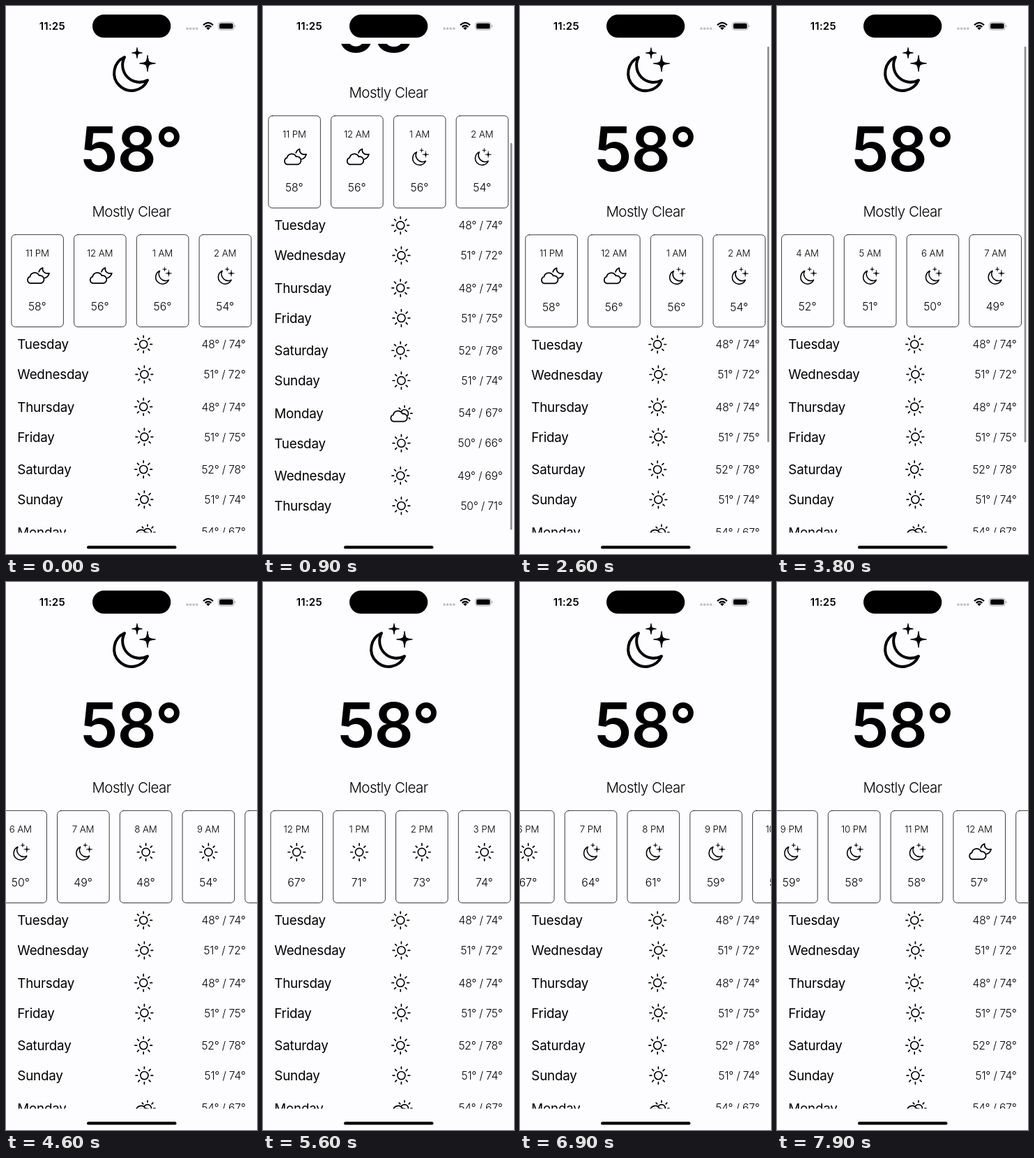
Write an HTML page that moves like this. It is 360x783 px and loops after 8 s.

```html
<!DOCTYPE html>
<html lang="en">
<head>
<meta charset="utf-8">
<title>Weather</title>
<style>
html, body { margin: 0; width: 100%; height: 100%; overflow: hidden; background: #fdfcfe; }
svg { display: block; width: 100%; height: 100%; }
text { font-family: Inter, Roboto, sans-serif; fill: #000; }
.line { fill: none; stroke: #000; stroke-linecap: round; stroke-linejoin: round; }
.time { font-size: 15px; font-weight: 600; letter-spacing: .2px; }
.now { font-size: 88px; font-weight: 600; letter-spacing: -1.2px; }
.sky { font-size: 20.5px; font-weight: 350; letter-spacing: -.55px; text-anchor: middle; }
.hour { font-size: 13.3px; font-weight: 350; letter-spacing: -.1px; text-anchor: middle; }
.temp { font-size: 15.8px; font-weight: 350; text-anchor: middle; }
.day { font-size: 18.8px; letter-spacing: -.22px; }
.range { font-size: 15.6px; font-weight: 350; letter-spacing: -.2px; text-anchor: end; }
</style>
</head>
<body>
<svg id="stage" viewBox="0 0 360 783"></svg>
<script>
const BG = '#fdfcfe';
const LOOP = 8000, STEP = 100;
const MAX = 157;               // vertical scroll range
const DRAG = 80, DRAG_MS = 100; // finger travel before each horizontal release
const PITCH = 89.77;           // distance between hourly cards

const at = (x, y, body, scale = 1) => `<g transform="translate(${x} ${y}) scale(${scale})">${body}</g>`;
const text = (cls, x, y, str) => `<text class="${cls}" x="${x}" y="${y}">${str}</text>`;
const line = (d, w, fill = 'none') => `<path class="line" d="${d}" stroke-width="${w}" style="fill:${fill}"/>`;

// Icons, each centred on 0,0
function star(x, y, r) {
  const c = r * .1;
  const arm = (cx, cy, ex, ey) => `C${cx} ${cy} ${cx} ${cy} ${ex} ${ey}`;
  return at(x, y, line(`M0 ${-r}${arm(c, -c, r, 0)}${arm(c, c, 0, r)}${arm(-c, c, -r, 0)}${arm(-c, -c, 0, -r)}z`, 1.2, '#000'));
}

const moon = line('M-14-18A25 25 0 1 0 19 15A24.4 24.4 0 0 1-14-18z', 4) + star(19, -9, 11.4) + star(4, -24, 7.4);

function sun(r = 5.6, near = 9.6, far = 12.3) {
  let rays = '';
  for (let i = 0; i < 8; i++) {
    const c = Math.cos(i * Math.PI / 4), s = Math.sin(i * Math.PI / 4);
    rays += `M${c * near} ${s * near}L${c * far} ${s * far}`;
  }
  return `<circle class="line" r="${r}" stroke-width="1.6"/>` + line(rays, 1.7);
}

const cloud = line('M-11 10.2A4.9 4.9 0 0 1-11.2.8A7 7 0 0 1 2-.8A5.6 5.6 0 0 1 4.5 10.2z', 1.75, BG);
const cloudMoon = line('M1.6-6.2C2.5-9 4.5-11 7-11.8C6.2-6 10.5-3 16.5-4.2C15.3-.5 13 2 10.2 2.6', 1.75) + cloud;
const cloudSun = at(4, 0, sun(5.4, 8.8, 11)) + at(-1, 1.3, cloud);

// Hourly cards, starting at 11 PM
const temps = [58, 56, 56, 54, 53, 52, 51, 50, 49, 48, 54, 59, 63, 67, 71, 73, 74, 74, 71, 67, 64, 61, 59, 58, 58, 57, 56, 55];
const skies = 'ccmmmmmmmsssssssssssmmmmmccc';
const hourIcon = {
  c: at(37.8, 386, cloudMoon),
  m: at(38.6, 385.5, moon, .39),
  s: at(37.3, 386, sun())
};

function card(temp, i) {
  const h = (23 + i) % 24;
  return at(7.8 + PITCH * i, 0,
    '<rect class="line" y="326.7" width="74.6" height="131.8" rx="5.5" stroke-width=".92" style="stroke:#2c2c2c"/>' +
    text('hour', 37.1, 358, `${h % 12 || 12} ${h < 12 ? 'AM' : 'PM'}`) +
    hourIcon[skies[i]] + text('temp', 37.1, 435.3, temp + '°'));
}

// Daily rows
const days = [
  ['Tuesday', 48, 74], ['Wednesday', 51, 72], ['Thursday', 48, 74], ['Friday', 51, 75], ['Saturday', 52, 78],
  ['Sunday', 51, 74], ['Monday', 54, 67], ['Tuesday', 50, 66], ['Wednesday', 49, 69], ['Thursday', 50, 71]
];

function row([name, low, high], i) {
  const y = 483.3 + 89.4 * (i >> 1) + 43 * (i % 2);
  const icon = name === 'Monday' ? at(199, 752, cloudSun) : at(197.2 + 1.2 * (i % 2), y, sun());
  return text('day', 16.3, y + 7, name) + icon + text('range', 343.6, y + 5.8, `${low}° / ${high}°`);
}

function statusBar() {
  let dots = '';
  for (let i = 0; i < 4; i++) dots += `<circle cx="${260 + 4.6 * i}" cy="32.3" r="1.7" fill="#bdbcbe"/>`;
  const wifi = '<g class="line" style="stroke-linecap:butt" stroke-width="2.2">' +
    '<path d="M283 27.2Q290 20.6 297 27.2M285.6 30Q290 26 294.4 30"/></g>' +
    '<path d="M287.2 31.4Q290 29.2 292.8 31.4L290 34.2z"/>';
  const battery = '<rect x="304.5" y="23.3" width="22.6" height="10.8" rx="3.4" fill="none" stroke="#a9a8aa"/>' +
    '<rect x="306" y="24.8" width="19.6" height="7.8" rx="2.2"/>' +
    '<path d="M328.3 27v3.6q1.4-.5 1.4-1.8t-1.4-1.8z" fill="#a9a8aa"/>';
  return text('time', 47.8, 34.2, '11:25') + '<rect x="124" y="12.3" width="112.3" height="33" rx="16.5"/>' + dots + wifi + battery;
}

document.getElementById('stage').innerHTML = `
  <clipPath id="view"><rect y="54" width="360" height="698.5"/></clipPath>
  <rect width="360" height="783" fill="${BG}"/>
  <g clip-path="url(#view)">
    <g id="page">
      ${at(184, 91, moon)}
      ${text('now', 106.8, 235.7, '58°')}
      ${text('sky', 180, 301, 'Mostly Clear')}
      <g id="cards">${temps.map(card).join('')}</g>
      ${days.map(row).join('')}
    </g>
  </g>
  <rect id="bar" x="354.7" width="2.7" rx="1.35" fill="#8e8d8f"/>
  ${statusBar()}
  <rect x="116" y="771.2" width="128.5" height="4.4" rx="2.2"/>`;

const [page, cards, bar] = ['page', 'cards', 'bar'].map(id => document.getElementById(id));
const clamp = (v, lo, hi) => Math.min(hi, Math.max(lo, v));

// Swipe to the far edge, then a damped bounce past it
function swipe(ms) {
  const hit = 145;
  if (ms <= 0) return 0;
  if (ms < hit) return MAX * (ms / hit) ** 1.16;
  const s = (ms - hit) / 1000;
  return MAX + 1260 * s * Math.exp(-10 * s);
}

const scrollY = t => t < 1600 ? swipe(t - 400) : MAX - swipe(t - 1600);

// Each flick: start, glide distance, time a finger stops it
const flicks = [[3250, 623.6, 4800], [4920, 603.8, 6420], [6420, 643.5, LOOP]];

function scrollX(t) {
  let x = 0;
  for (const [start, glide, stop] of flicks) {
    const ms = Math.min(t, stop) - start;
    if (ms <= 0) break;
    x += DRAG * Math.min(1, ms / DRAG_MS) ** 1.5;
    if (ms > DRAG_MS) x += glide * (1 - Math.exp(-.002 * (ms - DRAG_MS)));
  }
  return x;
}

function draw(t) {
  const y = scrollY(t), inside = clamp(y, 0, MAX), over = Math.abs(y - inside);
  page.setAttribute('transform', `translate(0 ${-y})`);
  cards.setAttribute('transform', `translate(${-scrollX(t)} 0)`);
  bar.setAttribute('y', 58 + 125 * inside / MAX + (y > MAX ? over : 0));
  bar.setAttribute('height', 565.5 - over);
  bar.setAttribute('opacity', t < 500 ? 0 : clamp((4450 - t) / 300, 0, 1));
}

const begin = performance.now();
function tick() {
  const t = (performance.now() - begin) % LOOP;
  draw(Math.floor(t / STEP) * STEP);
  requestAnimationFrame(tick);
}
tick();
</script>
</body>
</html>
```
